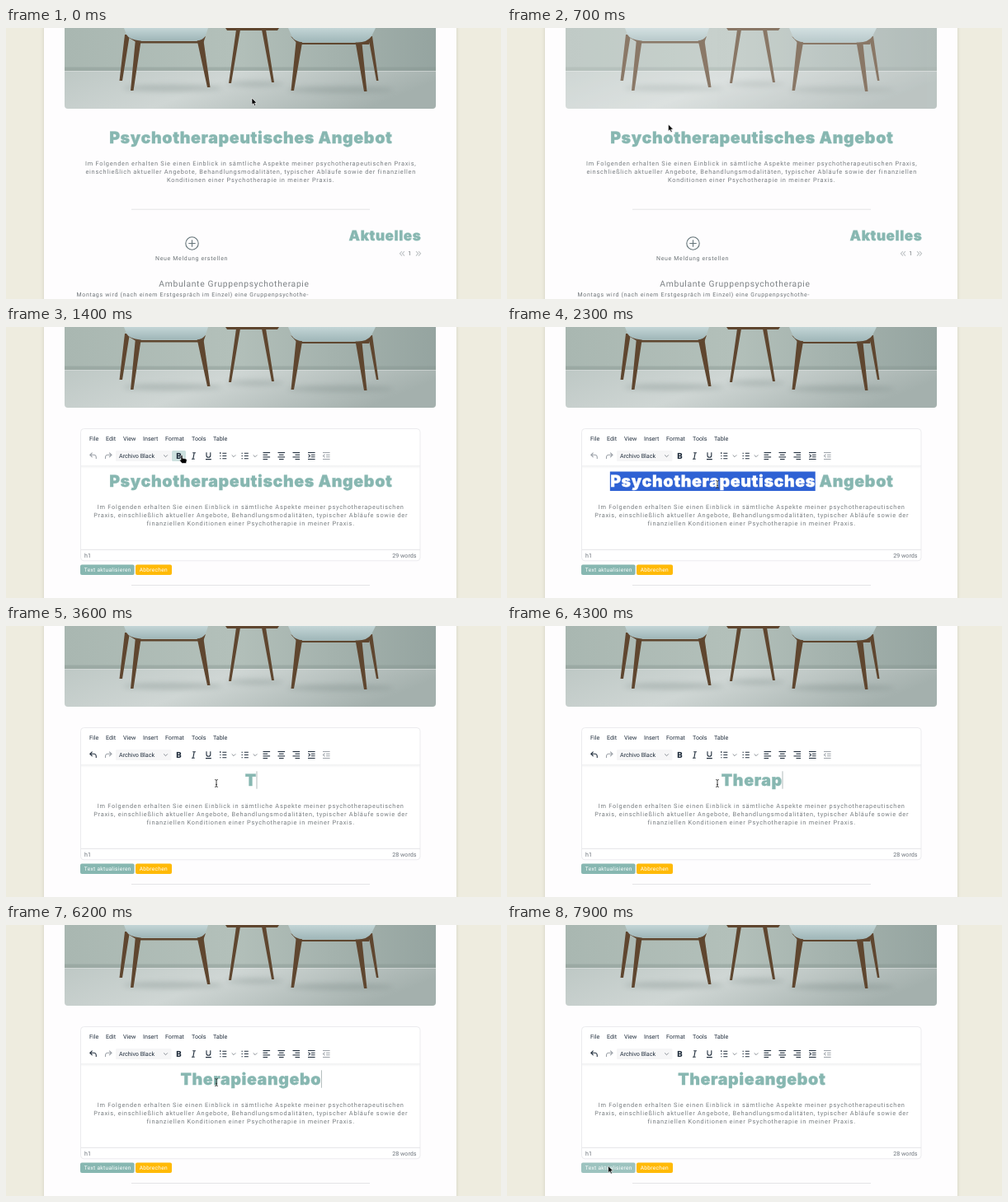
An HTML page that plays this animation: 600x329 px, repeating every 8 s.

```html
<!DOCTYPE html>
<html lang="de">
<head>
<meta charset="utf-8">
<title>Texteditor</title>
<style>
html, body { margin: 0; width: 100%; height: 100%; overflow: hidden; background: #eeecdf; }
svg { display: block; width: 600px; height: 329px; }
text { font-family: Roboto, sans-serif; text-rendering: geometricPrecision; white-space: pre; }
.head { font: 900 19.6px Inter, sans-serif; letter-spacing: .62px; fill: #87b7b1; stroke: #87b7b1; stroke-width: .35; text-anchor: middle; }
.picked { fill: #fff; stroke: #fff; }
.news { font-size: 17px; letter-spacing: .6px; text-anchor: end; }
.para { font-size: 7.4px; letter-spacing: .74px; fill: #777d80; text-anchor: middle; }
.small { font-size: 7px; letter-spacing: .66px; fill: #6c7376; }
.sub { font-size: 10.3px; letter-spacing: .68px; fill: #7d8285; text-anchor: end; }
.ui { font-size: 7.15px; fill: #222f3e; }
.status { fill: #6d747c; }
.btn { font-size: 6.6px; letter-spacing: .3px; fill: #fff; }
.end { text-anchor: end; }
.line { fill: none; stroke: #222f3e; stroke-width: 1.1; }
.thin { stroke-width: .8; stroke: #6d747c; }
.off { stroke: #9ba1a8; }
.wood { fill: #5f462f; }
.rule { stroke: #e4e4e6; stroke-width: 1; }
.cursor { fill: #000; stroke: #fff; stroke-width: .6; }
</style>
</head>
<body>
<svg viewBox="0 0 600 329">
  <defs>
    <linearGradient id="wall"><stop offset="0" stop-color="#a9b7b1"/><stop offset=".45" stop-color="#b3c0ba"/><stop offset="1" stop-color="#95a4a0"/></linearGradient>
    <linearGradient id="floor" x2="1" y2=".25"><stop offset="0" stop-color="#bec8c5"/><stop offset=".45" stop-color="#cfd6d4"/><stop offset="1" stop-color="#a4b0ad"/></linearGradient>
    <linearGradient id="seat" x2="0" y2="1"><stop offset="0" stop-color="#c3d5d6"/><stop offset="1" stop-color="#9fb6b8"/></linearGradient>
    <linearGradient id="drop" x2="0" y2="1"><stop offset="0" stop-color="#222f3e" stop-opacity=".07"/><stop offset="1" stop-color="#222f3e" stop-opacity="0"/></linearGradient>
    <filter id="blur" x="-20%" y="-100%" width="140%" height="300%"><feGaussianBlur stdDeviation="3"/></filter>
    <filter id="edge" x="-5%" width="110%"><feGaussianBlur stdDeviation="2"/></filter>
    <clipPath id="frame"><rect x="71" y="-10" width="450" height="108" rx="4"/></clipPath>
    <path id="chev" d="M-2.3-1.1 0 1.2 2.3-1.1"/>
  </defs>

  <rect width="600" height="329" fill="#eeecdf"/>
  <rect x="46" y="-20" width="500" height="370" fill="#b9b6a6" opacity=".55" filter="url(#edge)"/>
  <rect x="46" width="500" height="329" fill="#fefdfe"/>

  <g id="photo" clip-path="url(#frame)">
    <rect x="71" width="450" height="52" fill="url(#wall)"/>
    <rect x="71" y="47.5" width="450" height="5" fill="#84938f" opacity=".4"/>
    <rect x="71" y="52.5" width="450" height="46" fill="url(#floor)"/>
    <g fill="#71807d" opacity=".3" filter="url(#blur)">
      <ellipse cx="202" cy="73" rx="60" ry="4"/><ellipse cx="302" cy="68" rx="34" ry="3"/><ellipse cx="405" cy="75" rx="64" ry="4"/>
    </g>
    <g class="wood">
      <path d="M144 8H150L141 64H137.5ZM157 13H164L154.5 76H151ZM231 12H239L247.5 72H244Z"/>
      <path d="M146 10 162 16H232L242 10 239 18.5H160Z"/>
      <path d="M266 0H331L329 3H268ZM279 2H284L273 67H270ZM310 2H315L325 66H322Z"/>
      <path d="M352 12H360L349 76H345.5ZM423 14H431L437.5 77H434ZM439 10H444L451.5 64H449Z"/>
      <path d="M345 10 358 18H428L443 10 440 20H354Z"/>
    </g>
    <path d="M143 0H245L242 9Q239 15 230 15.5H163Q149 14 146 8Z" fill="url(#seat)"/>
    <path d="M342 0H448L443 10Q438 17.5 426 17.5H361Q349 17 346 9Z" fill="url(#seat)"/>
  </g>

  <g id="page">
    <text class="head" x="296.8" y="139.6">Psychotherapeutisches Angebot</text>
    <text class="para" x="296.7" y="166.5">Im Folgenden erhalten Sie einen Einblick in sämtliche Aspekte meiner psychotherapeutischen Praxis,</text>
    <text class="para" x="296.7" y="176.8">einschließlich aktueller Angebote, Behandlungsmodalitäten, typischer Abläufe sowie der finanziellen</text>
    <text class="para" x="296.7" y="187.1">Konditionen einer Psychotherapie in meiner Praxis.</text>
    <path class="rule" d="M152 220.2H441"/>
    <g class="line" style="stroke:#65757a"><circle cx="225.5" cy="261.5" r="7.7"/><path d="M221.3 261.5h8.4M225.5 257.3v8.4"/></g>
    <text class="small" x="181" y="281.8">Neue Meldung erstellen</text>
    <text class="head news" x="503.3" y="258">Aktuelles</text>
    <path class="line" style="stroke:#bfc4c6" d="M480 271l-2.6 2.8 2.6 2.8M483 271l-2.6 2.8 2.6 2.8M497 271l2.6 2.8-2.6 2.8M500 271l2.6 2.8-2.6 2.8"/>
    <text class="small" x="487.3" y="276.4">1</text>
    <text class="sub" x="367.7" y="313.8">Ambulante Gruppenpsychotherapie</text>
    <text class="small" x="85.5" y="326.3">Montags wird (nach einem Erstgespräch im Einzel) eine Gruppenpsychothe-</text>
  </g>

  <g id="editor">
    <rect x="90.5" y="123.5" width="411.5" height="160.3" rx="4" fill="#fff" stroke="#ebebee"/>
    <rect x="91" y="168" width="410.5" height="4" fill="url(#drop)"/>
    <path class="rule" d="M91 270.3H502"/>
    <g id="menu"></g>

    <g id="undo" class="line"><path d="M104.6 152.6 101.8 155.3 104.6 158M102 155.3H107Q109.6 155.5 109.3 160"/></g>
    <g class="line off"><path d="M125.2 152.6 128 155.3 125.2 158M127.8 155.3H122.8Q120.2 155.5 120.5 160"/></g>
    <rect x="133" y="150" width="67.5" height="13" rx="1.5" fill="#f6f6f7"/>
    <text class="ui" x="137" y="159">Archivo Black</text>
    <g class="line thin"><use href="#chev" x="193.5" y="156.5"/><use href="#chev" x="276" y="156.5"/><use href="#chev" x="302" y="156.5"/></g>
    <rect id="bold" x="201" y="150" width="17" height="13" rx="1.5" fill="#cde1df"/>
    <text class="ui" x="206.2" y="160" style="font-size:10px;font-weight:900">B</text>
    <path class="line" d="M226.2 152.7h3.7M225 160.2h3.7M228.2 152.7 226.8 160.2"/>
    <path class="line" d="M243 152.3v3.6q0 2.3 2.4 2.3t2.4-2.3v-3.6M242 160.6h6.8"/>
    <path class="line" d="M262.3 153.2h5M262.3 156.5h5M262.3 159.8h5M288.8 153.2h5M288.8 156.5h5M288.8 159.8h5"/>
    <path class="line" d="M259.8 152v2.2M259.2 156.5h1.3M259.2 159.8h1.3M285.5 153.2h1.4M285.5 156.5h1.4M285.5 159.8h1.4"/>
    <g id="aligns" class="line"></g>
    <path class="line" d="M366 152.5h8.6M370 155.2h4.6M370 157.8h4.6M366 160.5h8.6M366.5 154.7 368.5 156.5 366.5 158.3"/>
    <path class="line off" d="M384 152.5h8.6M388 155.2h4.6M388 157.8h4.6M384 160.5h8.6M386.5 154.7 384.5 156.5 386.5 158.3"/>

    <rect id="mark" y="175.5" height="23.5" fill="#2f62d4"/>
    <text id="title" class="head" x="296.8" y="193.8"><tspan id="first"></tspan><tspan id="rest"></tspan></text>
    <rect id="caret" y="176.3" width=".9" height="21.4" fill="#a9b3b3"/>
    <text class="para" x="296.7" y="220.5">Im Folgenden erhalten Sie einen Einblick in sämtliche Aspekte meiner psychotherapeutischen</text>
    <text class="para" x="296.7" y="230.8">Praxis, einschließlich aktueller Angebote, Behandlungsmodalitäten, typischer Abläufe sowie der</text>
    <text class="para" x="296.7" y="241.1">finanziellen Konditionen einer Psychotherapie in meiner Praxis.</text>
    <text class="ui status" x="95" y="279.6">h1</text>
    <text id="words" class="ui status end" x="497.5" y="279.6"></text>
    <rect id="save" x="90" y="288.4" width="65.6" height="12.6" rx="2"/>
    <text class="btn" x="94.8" y="297">Text aktualisieren</text>
    <rect x="157" y="288.4" width="44" height="12.6" rx="2" fill="#ffba08"/>
    <text class="btn" x="161.7" y="297">Abbrechen</text>
    <path class="rule" d="M152 313.5H441"/>
  </g>

  <g id="pointer">
    <path id="arrow" class="cursor" d="M0 0V8.2L1.9 6.5 3.3 9.6 4.7 9 3.4 6H6Z"/>
    <path id="beam" fill="none" stroke="#333" stroke-width=".9" d="M-1.8-4.5Q0-4.5 0-3.3Q0-4.5 1.8-4.5M0-3.5V3.5M-1.8 4.5Q0 4.5 0 3.3Q0 4.5 1.8 4.5M-1 1.4H1"/>
    <path id="hand" class="cursor" d="M-1 .3Q0-.7 1 .3V3.6L5 4.3Q6.4 4.7 6.2 6.2L5.4 9.8H.4L-2.6 6.3Q-2.9 5.2-1.8 5.2L-1 5.8Z"/>
  </g>
</svg>
<script>
const $ = id => document.getElementById(id);
const show = (id, on) => $(id).setAttribute('visibility', on ? 'inherit' : 'hidden');
const clamp = v => Math.max(0, Math.min(1, v));
const ramp = (t, a, b) => clamp((t - a) / (b - a));
const ease = p => p * p * (3 - 2 * p);

const LOOP = 8000, STEP = 100, OPEN = 1000, TYPING = 3600, CENTER = 296.5;
const OLD = ['Psychotherapeutisches', ' Angebot'];
const NEW = 'Therapieangebot';
const keys = [3600, 3800, 3900, 4000, 4200, 4300, 4500, 4800, 5200, 5400, 5600, 5800, 6000, 6200, 6400];
const path = [
  [0, 298, 85], [700, 195.5, 117], [900, 197, 122], [1100, 197, 123],
  [1400, 213, 155.7], [2000, 255, 191], [6800, 255, 191], [7700, 122.7, 292.5]
];

const menu = { File: 101, Edit: 121, View: 142, Insert: 166, Format: 193, Tools: 225, Table: 251 };
$('menu').innerHTML = Object.entries(menu)
  .map(([name, x]) => `<text class="ui" x="${x}" y="137.7">${name}</text>`).join('');

// left, centred and right alignment icons
$('aligns').innerHTML = [0, .5, 1].map((side, i) => [8.6, 5.6, 8.6, 5.6]
  .map((w, row) => `<path d="M${311.5 + 18 * i + (8.6 - w) * side} ${152.5 + row * 2.7}h${w}"/>`)
  .join('')).join('');

function place(t) {
  const i = path.findIndex(p => p[0] > t);
  if (i < 0) return path[path.length - 1].slice(1);
  const [t0, x0, y0] = path[i - 1], [t1, x1, y1] = path[i];
  const p = ease(ramp(t, t0, t1));
  return [x0 + (x1 - x0) * p, y0 + (y1 - y0) * p];
}

function drawTitle(t, open) {
  const typed = keys.filter(k => k <= t);
  const typing = t >= TYPING;
  const [a, b] = typing ? [NEW.slice(0, typed.length), ''] : OLD;
  $('first').textContent = a;
  $('rest').textContent = b;

  const word = t >= 2200 && !typing, all = t >= 2400 && !typing;
  $('first').classList.toggle('picked', word);
  $('rest').classList.toggle('picked', all);

  const full = $('title').getComputedTextLength();
  const left = CENTER - full / 2;
  const part = all ? full : $('first').getComputedTextLength();
  $('mark').setAttribute('x', left);
  $('mark').setAttribute('width', part);
  show('mark', open && word);

  const since = t - typed[typed.length - 1];
  $('caret').setAttribute('x', left + full);
  show('caret', typing && Math.floor(since / 500) % 2 === 0);
  $('words').textContent = (typing ? 28 : 29) + ' words';
}

function drawPointer(t, open) {
  const [x, y] = place(t);
  const beam = open && y > 169 && y < 270;
  const hand = open && y > 148 && y <= 169 && t < 3000;
  $('pointer').setAttribute('transform', `translate(${x} ${y})`);
  show('beam', beam);
  show('hand', hand);
  show('arrow', !beam && !hand);
  show('bold', open && x > 201 && x < 218 && y > 150 && y < 163);
}

function draw(t) {
  const open = t >= OPEN;
  show('page', !open);
  show('editor', open);
  $('photo').setAttribute('opacity', 1 - .27 * (ramp(t, 100, 600) - ramp(t, 900, 1300)));
  $('undo').setAttribute('class', t >= TYPING ? 'line' : 'line off');
  const hover = ramp(t, 7600, 7900);
  $('save').setAttribute('fill', `rgb(${135 + 22 * hover},${183 + 12 * hover},${177 + 14 * hover})`);
  drawTitle(t, open);
  drawPointer(t, open);
}

function tick(now) {
  draw(Math.floor(now % LOOP / STEP) * STEP);
  requestAnimationFrame(tick);
}
draw(0);
requestAnimationFrame(tick);
</script>
</body>
</html>
```
